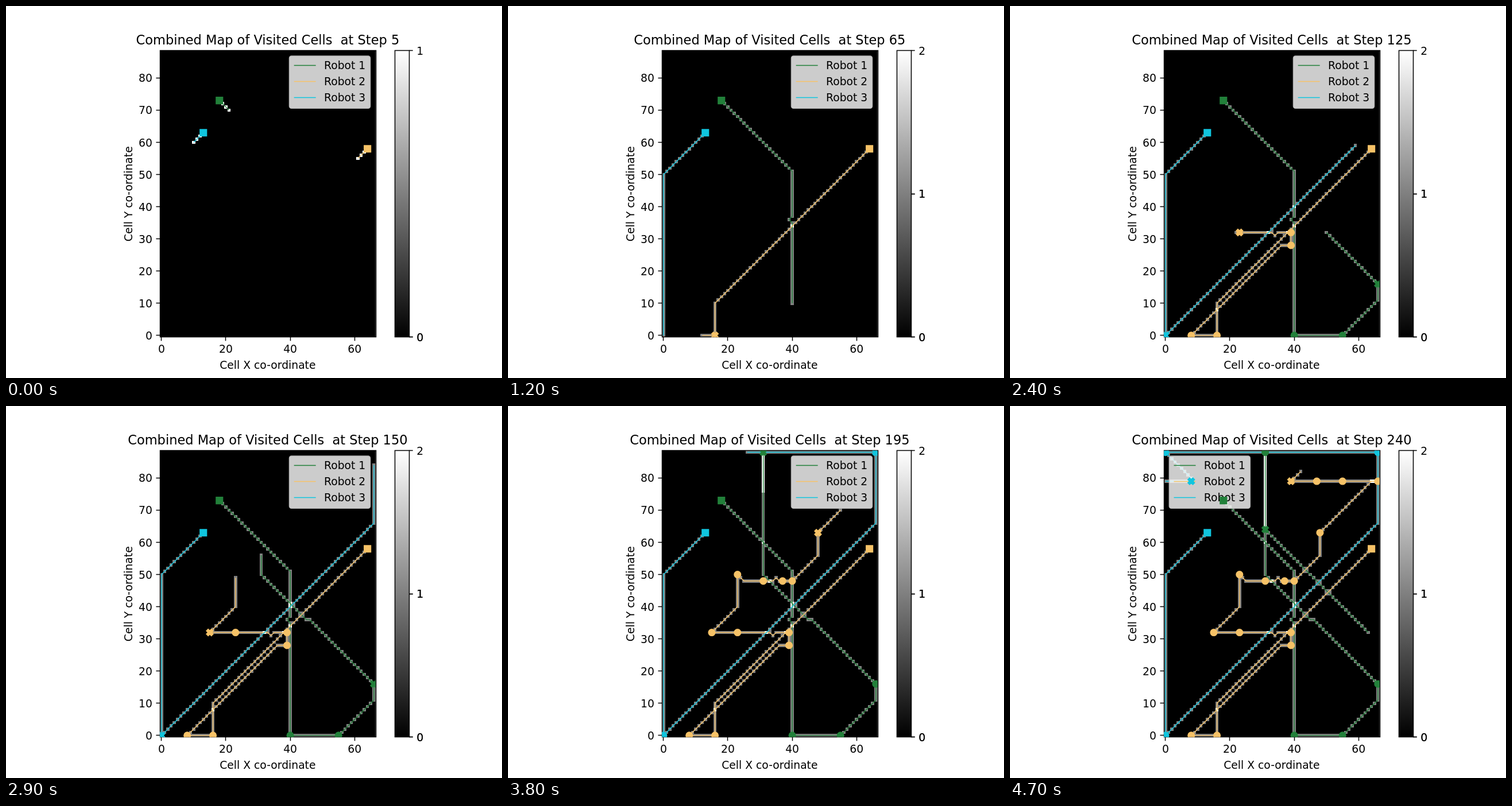
Animation of 864 by 648 pixels, one loop 4800 ms. Source, as an HTML page with a canvas:

```html
<!DOCTYPE html>
<html lang="en">
<head>
<meta charset="utf-8">
<title>Visited cells</title>
<style>
  html, body { margin: 0; width: 100%; height: 100%; overflow: hidden; background: #fff; }
  canvas { display: block; }
</style>
</head>
<body>
<canvas id="stage" width="864" height="648"></canvas>
<script>
const ctx = document.getElementById('stage').getContext('2d');
const COLS = 67, ROWS = 89;
const TOP = 77.76, BOTTOM = 576.72, RIGHT = 643.68;
const CELL = (BOTTOM - TOP) / ROWS, LEFT = RIGHT - COLS * CELL;
const BAR = { x: 677.16, w: 24.95 };
const FRAME_MS = 100, FRAMES = 48;

// Waypoints; a star marks a stop, where the robot waits one step and leaves a marker.
const robots = [
  { color: '#22803a', route: '18,73 40,51 40,37 39,36 40,35 40,0* 55,0* 66,11 66,16* 46,36 45,36 31,50 31,88* 31,64* 63,32' },
  { color: '#f6c267', route: '64,58 16,10 16,0* 8,0* 36,28 39,28* 39,32* 35,32 34,31 33,32 23,32* 15,32* 23,40 23,50* ' +
      '25,48 31,48* 34,48 35,49 36,48 37,48* 40,48* 48,56 48,63* 64,79 66,79* 55,79* 47,79* 39,79* 42,82' },
  { color: '#10c5de', route: '13,63 0,50 0,0* 66,66 66,88* 0,88* 8,80 8,79* 0,79' }
];
for (const robot of robots) robot.path = expand(robot.route);

function expand(route) {
  const path = [];
  for (const point of route.split(' ')) {
    const [tx, ty] = point.split(',').map(parseFloat);
    let { x, y } = path[path.length - 1] || { x: tx, y: ty };
    if (!path.length) path.push({ x, y });
    while (x !== tx || y !== ty) {
      x += Math.sign(tx - x);
      y += Math.sign(ty - y);
      path.push({ x, y });
    }
    if (point.endsWith('*')) path.push({ x, y, stop: true });
  }
  return path;
}

const px = x => LEFT + (x + 0.5) * CELL;
const py = y => BOTTOM - (y + 0.5) * CELL;
const snap = v => Math.floor(v) + 0.5;

function text(str, x, y, align = 'center', size = 18.75) {
  ctx.font = `${size}px "DejaVu Sans", sans-serif`;
  ctx.textAlign = align;
  ctx.fillStyle = '#000';
  ctx.fillText(str, x, y);
}

function line(x1, y1, x2, y2, color = '#000', width = 1.5) {
  ctx.strokeStyle = color;
  ctx.lineWidth = width;
  ctx.beginPath();
  ctx.moveTo(x1, y1);
  ctx.lineTo(x2, y2);
  ctx.stroke();
}

function outline(x, y, x2, y2) {
  ctx.strokeStyle = '#000';
  ctx.lineWidth = 1.5;
  ctx.strokeRect(snap(x), snap(y), Math.round(x2 - x), Math.round(y2 - y));
}

function drawAxes(step) {
  text('Combined Map of Visited Cells  at Step ' + step, (LEFT + RIGHT) / 2, 66.5, 'center', 22.5);
  text('Cell X co-ordinate', (LEFT + RIGHT) / 2, 631.5);
  ctx.save();
  ctx.translate(219.5, (TOP + BOTTOM) / 2);
  ctx.rotate(-Math.PI / 2);
  text('Cell Y co-ordinate', 0, 0);
  ctx.restore();
  for (let v = 0; v <= 60; v += 20) {
    const x = snap(px(v));
    line(x, BOTTOM, x, BOTTOM + 6.6);
    text(v, px(v), 604);
  }
  for (let v = 0; v <= 80; v += 10) {
    const y = snap(py(v));
    line(LEFT - 6.6, y, LEFT, y);
    text(v, LEFT - 13.1, py(v) + 7, 'right');
  }
}

function drawBar(max) {
  const end = BAR.x + BAR.w;
  const shade = ctx.createLinearGradient(0, BOTTOM, 0, TOP);
  shade.addColorStop(0, '#000');
  shade.addColorStop(1, '#fff');
  ctx.fillStyle = shade;
  ctx.fillRect(BAR.x, TOP, BAR.w, BOTTOM - TOP);
  outline(BAR.x, TOP, end, BOTTOM);
  for (let v = 0; v <= max; v++) {
    const y = BOTTOM - (BOTTOM - TOP) * v / max;
    // Labels below the maximum are printed twice, which makes them heavier.
    for (let n = v < max ? 2 : 1; n--;) {
      line(end, snap(y), end + 6.6, snap(y));
      text(v, end + 13.1, y + 7, 'left');
    }
  }
}

function drawCells(counts, max) {
  ctx.fillStyle = '#000';
  ctx.fillRect(LEFT, TOP, RIGHT - LEFT, BOTTOM - TOP);
  counts.forEach((count, id) => {
    const x = id % COLS, y = Math.floor(id / COLS);
    const x1 = Math.round(LEFT + x * CELL), x2 = Math.round(LEFT + (x + 1) * CELL);
    const y1 = Math.round(BOTTOM - (y + 1) * CELL), y2 = Math.round(BOTTOM - y * CELL);
    const level = Math.round(255 * count / max);
    ctx.fillStyle = `rgb(${level},${level},${level})`;
    ctx.fillRect(x1, y1, x2 - x1, y2 - y1);
  });
}

function drawTrail(path, color) {
  ctx.strokeStyle = color;
  ctx.lineWidth = 1.4;
  ctx.lineJoin = 'round';
  ctx.beginPath();
  for (const p of path) ctx.lineTo(px(p.x), py(p.y));
  ctx.stroke();
}

function drawLegend(x) {
  const y = TOP + 9.4;
  ctx.beginPath();
  ctx.roundRect(x, y, 140.7, 91, 3.75);
  ctx.fillStyle = 'rgba(255,255,255,0.8)';
  ctx.fill();
  ctx.strokeStyle = 'rgba(204,204,204,0.8)';
  ctx.lineWidth = 1.9;
  ctx.stroke();
  robots.forEach((robot, i) => {
    const base = 110 + 28 * i;
    line(x + 8, base - 6.5, x + 46, base - 6.5, robot.color, 1.4);
    text('Robot ' + (i + 1), x + 60.3, base, 'left');
  });
}

function drawMarker({ x, y }, shape, color) {
  const r = 5.625, h = r / 2;
  ctx.save();
  ctx.translate(px(x), py(y));
  ctx.fillStyle = ctx.strokeStyle = color;
  ctx.lineWidth = 1.875;
  ctx.lineJoin = 'miter';
  ctx.beginPath();
  if (shape === 'square') ctx.rect(-r, -r, 2 * r, 2 * r);
  else if (shape === 'circle') ctx.arc(0, 0, r, 0, 2 * Math.PI);
  else {
    for (let k = 0; k < 4; k++) {
      ctx.lineTo(-h, -r);
      ctx.lineTo(0, -h);
      ctx.lineTo(h, -r);
      ctx.rotate(Math.PI / 2);
    }
    ctx.closePath();
  }
  ctx.fill();
  ctx.stroke();
  ctx.restore();
}

function draw(frame) {
  const step = 5 * (frame + 1);
  const trails = robots.map(robot => robot.path.slice(0, step - 1));
  const counts = new Map();
  for (const p of trails.flat()) {
    const id = p.y * COLS + p.x;
    if (!p.stop) counts.set(id, (counts.get(id) || 0) + 1);
  }
  const max = Math.max(...counts.values());

  ctx.fillStyle = '#fff';
  ctx.fillRect(0, 0, 864, 648);
  drawAxes(step);
  drawBar(max);

  ctx.save();
  ctx.beginPath();
  ctx.rect(Math.round(LEFT), Math.round(TOP), Math.round(RIGHT - LEFT), Math.round(BOTTOM - TOP));
  ctx.clip();
  drawCells(counts, max);
  robots.forEach((robot, i) => drawTrail(trails[i], robot.color));
  ctx.restore();

  outline(LEFT, TOP, RIGHT, BOTTOM);
  // The legend leaves the right corner once a trail runs well into it.
  drawLegend(step < 200 ? RIGHT - 150 : LEFT + 9.4);

  ctx.save();
  ctx.beginPath();
  ctx.rect(LEFT, TOP, RIGHT - LEFT, BOTTOM - TOP);
  ctx.clip();
  robots.forEach((robot, i) => {
    drawMarker(robot.path[0], 'square', robot.color);
    const stops = trails[i].filter(p => p.stop);
    stops.forEach((p, n) => drawMarker(p, n < stops.length - 1 ? 'circle' : 'cross', robot.color));
  });
  ctx.restore();
}

const start = performance.now();
function tick() {
  draw(Math.floor((performance.now() - start) / FRAME_MS) % FRAMES);
  requestAnimationFrame(tick);
}
tick();
</script>
</body>
</html>
```
